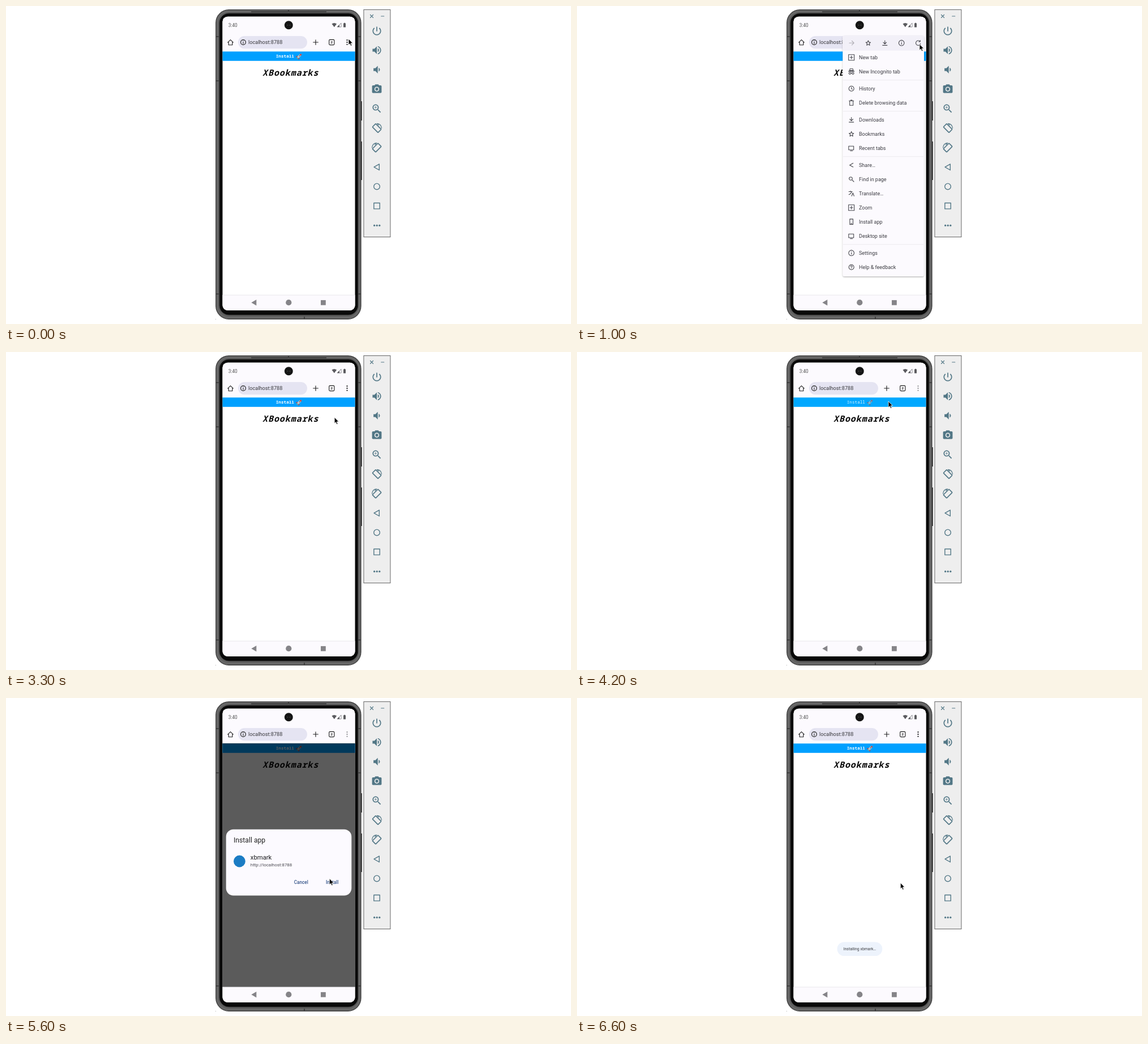
Recreate the animation shown at these times as an HTML page. Size 998 by 561 pixels, loop 8 s.

```html
<!DOCTYPE html>
<html lang="en">
<head>
<meta charset="utf-8">
<title>Install app</title>
<style>
  html, body { margin: 0; width: 100%; height: 100%; overflow: hidden; background: #fff; }
  svg { display: block; width: 100%; height: 100%; }
  text { font-family: Roboto, "Noto Sans", sans-serif; }
  .mono { font-family: "Noto Sans Mono", "DejaVu Sans Mono", monospace; font-weight: 700; }
  .line { fill: none; stroke-linecap: round; stroke-linejoin: round; }
</style>
</head>
<body>
<svg viewBox="0 0 998 561">
  <defs>
    <clipPath id="screen"><rect x="382.5" y="18.7" width="234" height="518.3" rx="9"/></clipPath>
    <filter id="shadow" x="-10%" y="-10%" width="120%" height="120%">
      <feDropShadow dx="0" dy="1.2" stdDeviation="1.2" flood-opacity=".3"/>
    </filter>
  </defs>

  <!-- phone body -->
  <path d="M628 168v34M628 239v68" stroke="#4a4a4a" stroke-width="2"/>
  <rect x="370.7" y="6.7" width="256.3" height="545.6" rx="23" fill="#5e5e5e" stroke="#404040" stroke-width="1.2"/>
  <rect x="373.4" y="9.4" width="250.9" height="540.2" rx="20.5" fill="none" stroke="#6c6c6c" stroke-width="1.6"/>
  <rect x="377" y="13" width="244.7" height="532" rx="17" fill="#080808" stroke="#2c2c2c"/>
  <path d="M433 10.3h133" stroke="#2c2c2c" stroke-width="1.5"/>
  <path d="M371 54h5M371 132h5M371 508h5M622 54h5M622 132h5M622 508h5M499 7v4M527 548v4" stroke="#404040" stroke-width="2"/>
  <circle cx="370.3" cy="552.5" r=".5" fill="#888"/>

  <g clip-path="url(#screen)">
    <rect x="382" y="18" width="235" height="520" fill="#fff"/>
    <rect x="382" y="18" width="235" height="62.5" fill="#fcfafe"/>
    <text x="392.8" y="37" font-size="8.2" fill="#555">3:40</text>
    <g fill="#5a5a5e">
      <path d="M575.5 31.6q4.3-3.4 8.6 0l-4.3 5.6z"/>
      <path d="M592 30v7h-7z" fill="none" stroke="#77777b" stroke-width=".8"/><path d="M589 33v4h-4z"/>
      <path d="M596 30.6h1v-.9h2v.9h1v6.8h-4z"/>
    </g>
    <circle cx="499.3" cy="33.7" r="7.5" fill="#151515"/>
    <circle cx="497.5" cy="33.7" r="1" fill="#3d3d3d"/><circle cx="501.5" cy="33.7" r="1" fill="#3d3d3d"/>

    <rect x="410" y="53" width="122" height="22.2" rx="11.1" fill="#e5e4f2"/>
    <g class="line" stroke="#222" stroke-width="1.15">
      <path d="M391.8 64.2l4.7-4.5 4.7 4.5h-1.4v4.6h-6.6v-4.6z"/>
      <circle cx="419" cy="64" r="4.4"/><path d="M419 63.7v2.4M419 61.8v.1"/>
      <path d="M542.7 64h8.6M547 59.7v8.6"/>
      <rect x="570.7" y="59.4" width="9.2" height="9.2" rx="1.5"/>
    </g>
    <text x="428" y="67.4" font-size="9.2" fill="#38383c">localhost:8788</text>
    <text x="575.3" y="66.3" font-size="6.2" font-weight="700" text-anchor="middle" fill="#222">2</text>
    <g id="dots"><circle cx="602.5" cy="60.2" r="1.15"/><circle cx="602.5" cy="64" r="1.15"/><circle cx="602.5" cy="67.8" r="1.15"/></g>

    <!-- page -->
    <rect id="bar" x="382" y="80.3" width="235" height="16.5"/>
    <text id="install" class="mono" x="476.7" y="90.7" font-size="7.7" fill="#fff">Install</text>
    <g id="rocket" transform="translate(518 88.4) rotate(45)">
      <path d="M-1.5 1l-2 2.6v1.6l2-1zM1.5 1l2 2.6v1.6l-2-1z" fill="#d93a35"/>
      <path d="M0-5.6Q3-2 1.5 3.8h-3Q-3-2 0-5.6z" fill="#b9c4ca"/>
      <path d="M0-5.6q1.5 1.6 1.9 3h-3.8q.4-1.4 1.9-3z" fill="#d93a35"/>
      <circle cy="-.9" r=".9" fill="#38586a"/><path d="M-1 4.2h2l-1 2z" fill="#ffb300"/>
    </g>
    <text class="mono" x="453" y="122.6" font-size="15" font-style="italic" letter-spacing=".95" fill="#080808" style="font-weight:600">XBookmarks</text>

    <rect id="shade" x="382" y="79.8" width="235" height="430.2" opacity="0"/>
    <g id="dialog">
      <rect x="388.7" y="231.8" width="221.6" height="116.8" rx="13" fill="#fcfaff"/>
      <text x="402" y="255" font-size="12.2" fill="#222">Install app</text>
      <circle cx="412.4" cy="288" r="10.4" fill="#1b7cc4"/>
      <text x="431.8" y="285" font-size="11.3" fill="#1d1d20">xbmark</text>
      <text x="431.8" y="297" font-size="7.9" fill="#4c4c52">http://localhost:8788</text>
      <g font-size="8.15" font-weight="500" fill="#35558a">
        <text x="508.8" y="328.4">Cancel</text><text x="565" y="328.4">Install</text>
      </g>
    </g>
    <g id="toast">
      <rect x="459.5" y="430.5" width="79.8" height="24.6" rx="12.3" fill="#edf3fc"/>
      <text x="470.6" y="445.2" font-size="6.95" fill="#3a3c40">Installing xbmark…</text>
    </g>

    <g id="menu">
      <g filter="url(#shadow)"><rect x="469.3" y="52" width="143.7" height="425" rx="3.5" fill="#fcfafe"/></g>
      <path d="M469.3 78.5v-23q0-3.5 3.5-3.5h136.7q3.5 0 3.5 3.5v23z" fill="#f2f0f8"/>
    </g>

    <rect x="382" y="510" width="235" height="28" fill="#fcfafe"/>
    <path d="M382 510h235" stroke="#e3e2e6" stroke-width=".8"/>
    <g fill="#858488">
      <path d="M433.3 523.2l9-5.2v10.4z"/><circle cx="499.3" cy="523.2" r="5.1"/><rect x="556" y="518.9" width="8.8" height="8.8"/>
    </g>
  </g>

  <!-- side toolbar -->
  <rect x="631.9" y="6.5" width="47" height="401" fill="#eee" stroke="#666"/>
  <g id="tools" fill="#527786">
    <g class="line" stroke="#527786" stroke-width="1.2">
      <path d="M643.5 15.5l5 5M648.5 15.5l-5 5M662.7 18h5"/>
      <path d="M650 284.2l9.3-5.3v10.6z" stroke-width="1.4"/>
      <circle cx="655" cy="318.4" r="5.3" stroke-width="1.4"/>
      <rect x="649.8" y="347.5" width="10.4" height="10.4" stroke-width="1.4"/>
      <g id="turn" transform="translate(655 215.5)">
        <rect x="-4.1" y="-7" width="8.2" height="14" rx="1" transform="rotate(-45)" stroke-width="1.7"/>
        <path d="M.4-8.2Q7.8-7.4 8.4 0M.4-8.2l2.8 2.8"/>
      </g>
      <use href="#turn" transform="translate(1310 34.4) scale(-1 1)"/>
    </g>
    <circle cx="650.6" cy="387.2" r="1.6"/><circle cx="655.2" cy="387.2" r="1.6"/><circle cx="659.8" cy="387.2" r="1.6"/>
  </g>
  <path id="cursor" d="M0 0V10.8L2.4 8.5 4.1 12.4 5.9 11.6 4.3 7.8H7.6z" stroke="#fff" stroke-width=".8"/>
</svg>
<script>
const $ = id => document.getElementById(id);
const add = (parent, tag, attrs, text = "") => {
  const el = document.createElementNS("http://www.w3.org/2000/svg", tag);
  for (const k in attrs) el.setAttribute(k, attrs[k]);
  el.textContent = text;
  return parent.appendChild(el);
};
const show = (el, alpha) => el.setAttribute("opacity", alpha);
const ramp = (t, from, to) => Math.min(1, Math.max(0, (t - from) / (to - from)));

// toolbar glyphs on a 24-unit grid
[
  [44, "M13 3h-2v10h2V3zm4.83 2.17l-1.42 1.42C17.99 7.86 19 9.81 19 12c0 3.87-3.13 7-7 7s-7-3.13-7-7c0-2.19 1.01-4.14 2.58-5.42L6.17 5.17C4.23 6.82 3 9.26 3 12c0 4.97 4.03 9 9 9s9-4.03 9-9c0-2.74-1.23-5.18-3.17-6.83z"],
  [78, "M3 9v6h4l5 5V4L7 9H3zm13.5 3c0-1.77-1.02-3.29-2.5-4.03v8.05c1.48-.73 2.5-2.25 2.5-4.02zM14 3.23v2.06c2.89.86 5 3.54 5 6.71s-2.11 5.85-5 6.71v2.06c4.01-.91 7-4.49 7-8.77s-2.99-7.86-7-8.77z"],
  [112.3, "M18.5 12c0-1.77-1.02-3.29-2.5-4.03v8.05c1.48-.73 2.5-2.25 2.5-4.02zM5 9v6h4l5 5V4L9 9H5z"],
  [146.7, "M9 2L7.17 4H4c-1.1 0-2 .9-2 2v12c0 1.1.9 2 2 2h16c1.1 0 2-.9 2-2V6c0-1.1-.9-2-2-2h-3.17L15 2H9zm3 15c-2.76 0-5-2.24-5-5s2.24-5 5-5 5 2.24 5 5-2.24 5-5 5zM12 8.8a3.2 3.2 0 1 0 .01 0z"],
  [181, "M15.5 14h-.79l-.28-.27C15.41 12.59 16 11.11 16 9.5 16 5.91 13.09 3 9.5 3S3 5.91 3 9.5 5.91 16 9.5 16c1.61 0 3.09-.59 4.23-1.57l.27.28v.79l5 4.99L20.49 19l-4.99-5zm-6 0C7.01 14 5 11.99 5 9.5S7.01 5 9.5 5 14 7.01 14 9.5 11.99 14 9.5 14zM12 10h-2v2H9v-2H7V9h2V7h1v2h2v1z"]
].forEach(([y, d]) => add($("tools"), "path", { d, transform: `translate(655 ${y}) scale(.84) translate(-12 -12)` }));

// menu glyphs, centred on 0,0
const ring = r => `M${-r} 0a${r} ${r} 0 1 0 ${2 * r} 0a${r} ${r} 0 1 0 ${-2 * r} 0`;
const glyph = {
  next: "M-4 0H4M.5-3.7L4.2 0 .5 3.7",
  star: "M0-4.2L1.2-1.3 4.2-1 1.9 1 2.6 4 0 2.4-2.6 4-1.9 1-4.2-1-1.2-1.3z",
  load: "M0-4.2V1.5M-2.8-1L0 1.8 2.8-1M-4 4.2H4",
  info: ring(4.8) + "M0-.3V2.3M0-2.3v.1",
  reload: "M3.2-2.8A4.2 4.2 0 1 0 4.2 1M3.6-4.6v2.4H1.2",
  plus: "M-5-5H5V5H-5zM-2.6 0H2.6M0-2.6V2.6",
  hat: "M-5.2-.6H5.2M-3.3-1.8l.9-3.2h4.8l.9 3.2zM-4.4 3a1.7 1.7 0 1 0 3.4 0a1.7 1.7 0 1 0-3.4 0M1 3a1.7 1.7 0 1 0 3.4 0a1.7 1.7 0 1 0-3.4 0M-1 2.6H1",
  clock: ring(4.5) + "M0-2.5V0L1.8 1.2",
  bin: "M-4-3.5H4M-3-3.5V4.5H3V-3.5M-1.3-4.6H1.3",
  screens: "M-4.8-3.5H4V3H-4.8zM-2 4.8H2",
  share: "M-3 0L3-3.4M-3 0L3 3.4",
  find: "M-4-1.2a2.8 2.8 0 1 0 5.6 0a2.8 2.8 0 1 0-5.6 0M1 1L4.3 4.3",
  words: "M-4.5-3.2H1.5M-1.5-4.5v1.3M.5-3.2Q-1 1-4.5 2M.5 4.5L2.6-1 4.7 4.5",
  phone: "M-2.8-4.8H2.8V4.8H-2.8zM-1 3.2H1",
  help: ring(4.5) + "M-1.5-1.2Q-1.3-2.7 0-2.7T1.5-1.2Q1.4-.3 0 .6M0 2.3v.1"
};
const icon = (parent, name, x, y) => add(parent, "path",
  { d: glyph[name], class: "line", stroke: "#46464c", "stroke-width": 1.1, transform: `translate(${x} ${y})` });

const head = ["next", "star", "load", "info", "reload"].map((name, i) => icon($("menu"), name, 485 + 29.4 * i, 65.2));
let y = 90.7;
const items = [
  ["New tab", "plus"], ["New Incognito tab", "hat", 1], ["History", "clock"], ["Delete browsing data", "bin", 1],
  ["Downloads", "load"], ["Bookmarks", "star"], ["Recent tabs", "screens", 1], ["Share…", "share"],
  ["Find in page", "find"], ["Translate…", "words"], ["Zoom", "plus"], ["Install app", "phone"],
  ["Desktop site", "screens", 1], ["Settings", "info"], ["Help & feedback", "help"]
].map(([label, name, divider]) => {
  const row = add($("menu"), "g", {});
  icon(row, name, 484.7, y);
  add(row, "text", { x: 498, y: y + 3.2, "font-size": 9, fill: "#3c3c42" }, label);
  if (divider) add(row, "path", { d: `M470 ${y + 15}h142`, stroke: "#e6e4ea", "stroke-width": .7 });
  y += divider ? 30 : 25;
  return row;
});

// pointer path: time, x, y
const path = [
  [0, 605, 58], [400, 605, 67.3], [1100, 605, 67.3], [1600, 600, 68.7], [2000, 600, 68.7], [2400, 581.5, 116.5],
  [3200, 581.5, 116.5], [4000, 550, 87], [4800, 550, 87], [5300, 583, 250], [5600, 571.3, 318.5],
  [5700, 571.3, 318.5], [5900, 571.3, 326]
];
function pointer(t) {
  const i = path.findIndex(p => p[0] > t);
  if (i < 0) return path.at(-1).slice(1);
  const [a, b] = [path[i - 1], path[i]], k = ramp(t, a[0], b[0]), e = k * k * (3 - 2 * k);
  return [1, 2].map(n => a[n] + (b[n] - a[n]) * e);
}

function draw(t) {
  const open = ramp(t, 100, 400) * (1 - ramp(t, 1000, 1300));
  const size = .7 + .3 * open;
  show($("menu"), open);
  $("menu").setAttribute("transform", `translate(613 52) scale(${size}) translate(-613 -52)`);
  head.forEach((el, i) => show(el, i ? ramp(t, 400 + 25 * i, 480 + 25 * i) : .4 * ramp(t, 400, 480)));
  items.forEach((el, i) => show(el, ramp(t, 440 + 28 * i, 520 + 28 * i)));

  const modal = ramp(t, 4200, 4400) * (1 - ramp(t, 6200, 6400));
  show($("shade"), .645 * modal);
  show($("dialog"), modal);
  show($("toast"), ramp(t, 6400, 6600));

  const pressed = t >= 4200 && t < 4600;
  $("bar").setAttribute("fill", pressed ? "#00a8ff" : "#00a0ff");
  $("install").style.fontWeight = pressed ? 400 : 700;
  show($("install"), pressed ? .85 : 1);
  show($("rocket"), pressed ? .65 : 1);
  $("dots").setAttribute("fill", t >= 4200 && t < 6300 ? "#929296" : "#1c1c1e");
  $("cursor").setAttribute("transform", `translate(${pointer(t)})`);
}

function tick(now) {
  draw(Math.floor(now % 8000 / 100) * 100);
  requestAnimationFrame(tick);
}
tick(performance.now());
</script>
</body>
</html>
```
